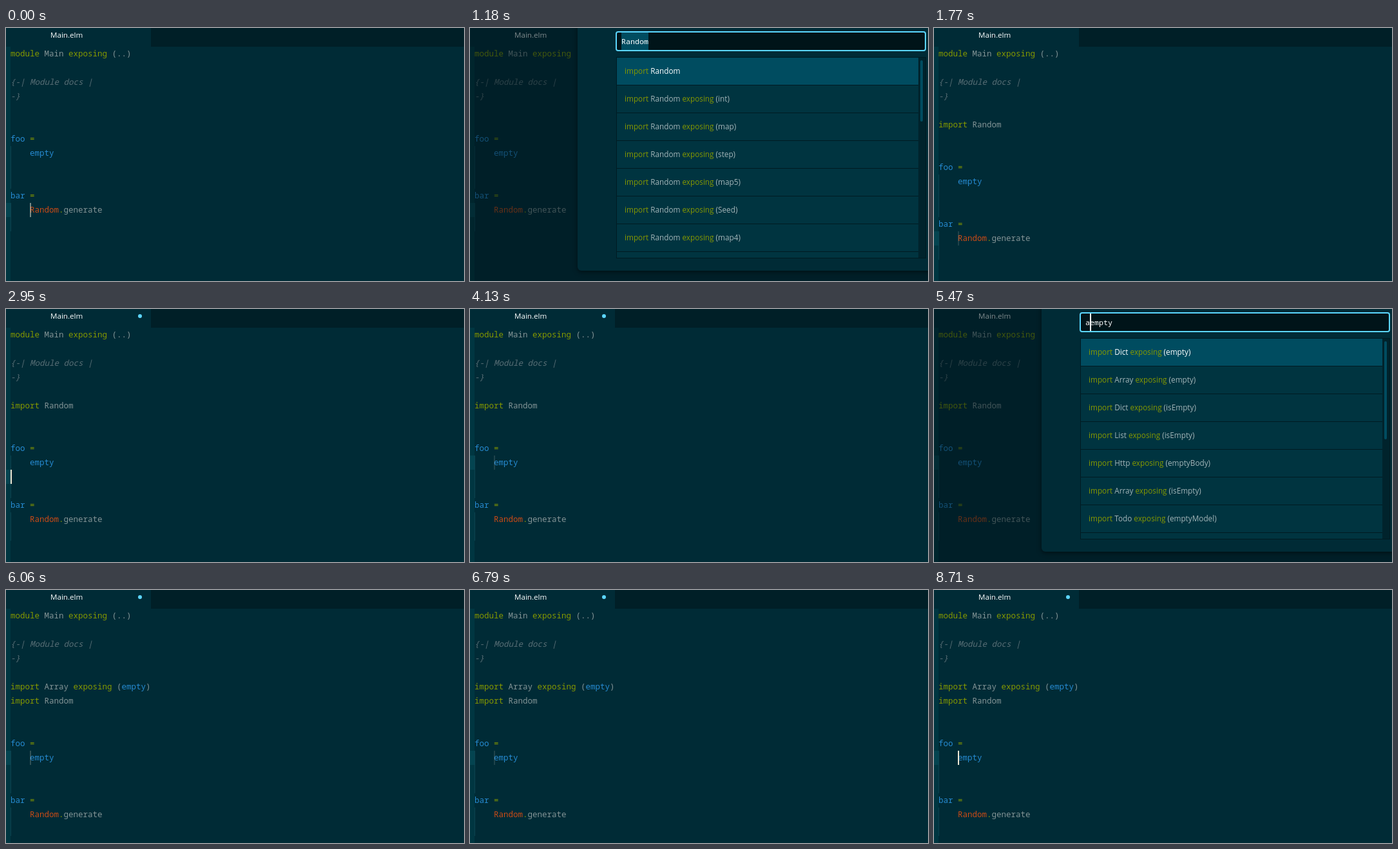
An HTML page with a canvas that plays this animation: 711x392 px, repeating every 8.81 s.

```html
<!DOCTYPE html>
<html lang="en">
<head>
<meta charset="utf-8">
<title>Import picker</title>
<style>
html, body { margin: 0; width: 100%; height: 100%; overflow: hidden; background: #002b36; }
canvas { display: block; width: 711px; height: 392px; }
</style>
</head>
<body>
<canvas id="stage"></canvas>
<script>
const W = 711, H = 392, LOOP = 8810, TICK = 147.6;
const LINE = 22, TOP = 29, LEFT = 7, CHAR = 7.5;
const MONO = '"Noto Sans Mono", "DejaVu Sans Mono", monospace';
const SANS = '"Open Sans", "Noto Sans", sans-serif';
const C = {
  bg: '#002b36', bar: '#001f27', gutter: '#003641', active: '#044450', guide: '#0d4350',
  text: '#839496', key: '#859900', fn: '#268bd2', type: '#cb4b16', note: '#586e75',
  cursor: '#eee8d5', accent: '#5cd6fd', field: '#001419', row: '#003440', picked: '#004c60',
  edge: '#001b22', item: '#a3b5b8', white: '#ffffff'
};

// Moments at which the scene changes, in ms.
const AT = {
  pickRandom: 1025, randomAdded: 1765, modified: 2055, caretUp: 2795, caretBlank: 2945,
  caretEmpty: 3385, pickEmpty: 4265, home: 5165, typed: 5465, narrowed: 5605, arrayAdded: 6055
};

const canvas = document.getElementById('stage');
const ctx = canvas.getContext('2d');
const ratio = window.devicePixelRatio || 1;
canvas.width = Math.round(W * ratio);
canvas.height = Math.round(H * ratio);

// Fades advance in even ticks, like the screen recording.
const stepped = t => Math.floor((t + 10) / TICK) * TICK;

function rect(x, y, w, h, color) {
  ctx.fillStyle = color;
  ctx.fillRect(x, y, w, h);
}

function label(str, x, y, color, font) {
  ctx.font = font;
  ctx.fillStyle = color;
  ctx.fillText(str, x, y);
}

function rounded(x, y, w, h, r) {
  ctx.beginPath();
  ctx.roundRect(x, y, w, h, r);
}

// Each line is a list of [style, text] tokens.
const IMPORT_RANDOM = [['key', 'import'], ['text', ' Random']];
const IMPORT_ARRAY = [['key', 'import'], ['text', ' Array '], ['key', 'exposing'],
  ['text', ' ('], ['fn', 'empty'], ['text', ')']];
const HEAD = [
  [['key', 'module'], ['text', ' Main '], ['key', 'exposing'], ['text', ' (..)']],
  [],
  [['note', '{-| Module docs |']],
  [['note', '-}']],
  []
];
const BODY = [
  [],
  [['fn', 'foo'], ['key', ' =']],
  [['fn', '    empty']],
  [],
  [],
  [['fn', 'bar'], ['key', ' =']],
  [['type', '    Random'], ['key', '.'], ['text', 'generate']]
];

function importsAt(t) {
  if (t < AT.randomAdded) return [];
  const lines = t < AT.arrayAdded ? [IMPORT_RANDOM] : [IMPORT_ARRAY, IMPORT_RANDOM];
  return [...lines, []];
}

// Row within BODY and column of the caret.
function caretAt(t) {
  if (t < AT.caretUp) return [6, 4];
  if (t < AT.caretBlank) return [5, 4];
  if (t < AT.caretEmpty) return [3, 0];
  return [2, 4];
}

function blink(t, start) {
  const p = (((stepped(t) - start) % 800) + 800) % 800;
  const ease = u => (1 - Math.cos(Math.PI * Math.min(u, 1))) / 2;
  const level = p < 400 ? 1 - ease(p / 300) : ease((p - 400) / 300);
  return 0.13 + 0.87 * level;
}

function caretLevel(t) {
  if (t < AT.randomAdded) return blink(t, -165);
  if (t < AT.caretUp) return blink(t, 1460);
  if (t < 3975) return 1;
  if (t < AT.arrayAdded) return blink(t, 3835);
  return blink(t, 6395);
}

function drawEditor(t, focused) {
  rect(0, 0, W, H, C.bg);
  rect(225, 0, W - 225, 29, C.bar);
  label('Main.elm', 69, 15, C.white, '11.6px ' + SANS);
  if (t >= AT.modified) {
    ctx.fillStyle = C.accent;
    ctx.beginPath();
    ctx.arc(208, 11, 3, 0, 7);
    ctx.fill();
  }

  const lines = [...HEAD, ...importsAt(t), ...BODY];
  const base = lines.length - BODY.length;
  const rowY = i => TOP + (base + i) * LINE;
  const [row, col] = caretAt(t);

  rect(0, TOP, LEFT, H - TOP, C.gutter);
  rect(0, rowY(row), LEFT + 1, LINE, C.active);
  rect(LEFT, rowY(2), 1, LINE * 3, C.guide);
  rect(LEFT, rowY(6), 1, LINE * 2, C.guide);

  lines.forEach((tokens, i) => {
    let at = 0;
    for (const [style, str] of tokens) {
      const font = (style === 'note' ? 'italic ' : '') + '12.5px ' + MONO;
      const pad = str.length - str.trimStart().length;
      label(str.slice(pad), LEFT + (at + pad) * CHAR, TOP + i * LINE + 15, C[style], font);
      at += str.length;
    }
  });

  if (focused) {
    ctx.globalAlpha = caretLevel(t);
    rect(LEFT + col * CHAR, rowY(row), 2, LINE, C.cursor);
    ctx.globalAlpha = 1;
  }
}

const RANDOM_ITEMS = ['Random', 'Random int', 'Random map', 'Random step', 'Random map5',
  'Random Seed', 'Random map4', 'Random'];
const EMPTY_ITEMS = ['Dict empty', 'Array empty', 'Dict isEmpty', 'List isEmpty',
  'Http emptyBody', 'Array isEmpty', 'Todo emptyModel', 'Set'];
const ARRAY_ITEMS = ['Array empty', 'Array isEmpty'];

function pickerAt(t) {
  if (t >= AT.pickRandom && t < AT.randomAdded) {
    return { open: 940, query: 'Random', selected: true, items: RANDOM_ITEMS, thumb: 95 };
  }
  if (t < AT.pickEmpty || t >= AT.arrayAdded) return null;
  const typed = t >= AT.typed;
  const narrowed = t >= AT.narrowed;
  return {
    open: 4180,
    query: typed ? 'aempty' : 'empty',
    selected: t < AT.home,
    caret: typed ? 1 : 0,
    items: narrowed ? ARRAY_ITEMS : EMPTY_ITEMS,
    thumb: narrowed ? 0 : 152
  };
}

function drawItem(item, y, picked) {
  const [mod, name] = item.split(' ');
  const plain = picked ? C.white : C.item;
  const words = [['import ', C.key], [mod + ' ', plain]];
  if (name) words.push(['exposing ', C.key], ['(' + name + ')', plain]);
  let x = 240;
  for (const [str, color] of words) {
    label(str, x, y, color, '11.75px ' + SANS);
    x += ctx.measureText(str).width;
  }
}

function drawPicker(p, t) {
  const fade = 1 - Math.pow(1 - Math.min(1, (stepped(t) - p.open) / 240), 3);
  rect(0, 0, W, H, `rgba(0, 20, 26, ${0.5 * fade})`);

  const bottom = Math.min(357, 46 + p.items.length * 43 + 1);
  ctx.save();
  ctx.shadowColor = 'rgba(0, 0, 0, 0.5)';
  ctx.shadowBlur = 7 * ratio;
  ctx.shadowOffsetY = 2 * ratio;
  ctx.fillStyle = C.bg;
  rounded(167, -20, 620, bottom + 39, 6);
  ctx.fill();
  ctx.restore();

  ctx.fillStyle = C.field;
  ctx.strokeStyle = C.accent;
  ctx.lineWidth = 2;
  rounded(227, 6, 480, 29, 3);
  ctx.fill();
  ctx.stroke();
  if (p.selected) rect(235, 7, p.query.length * 7, 27, C.picked);
  [...p.query].forEach((ch, i) =>
    label(ch, 235 + i * 7, 24.5, C.white, '11.67px ' + MONO));
  if (!p.selected) rect(235 + p.caret * 7, 7, 2, 27, C.white);

  rect(227, 45, 481, bottom - 45, C.edge);
  ctx.save();
  ctx.beginPath();
  ctx.rect(228, 46, 479, bottom - 47);
  ctx.clip();
  rect(696, 46, 11, bottom - 47, '#00232c');
  p.items.forEach((item, i) => {
    const y = 46 + i * 43;
    rect(228, y, 468, 42, i ? C.row : C.picked);
    drawItem(item, y + 25, i === 0);
  });
  if (p.thumb) {
    ctx.fillStyle = C.picked;
    rounded(699, 50, 4, p.thumb, 2);
    ctx.fill();
  }
  ctx.restore();
}

const start = performance.now();
function tick() {
  const t = (performance.now() - start) % LOOP;
  const picker = pickerAt(t);
  ctx.setTransform(ratio, 0, 0, ratio, 0, 0);
  drawEditor(t, !picker);
  if (picker) drawPicker(picker, t);
  requestAnimationFrame(tick);
}
tick();
</script>
</body>
</html>
```
